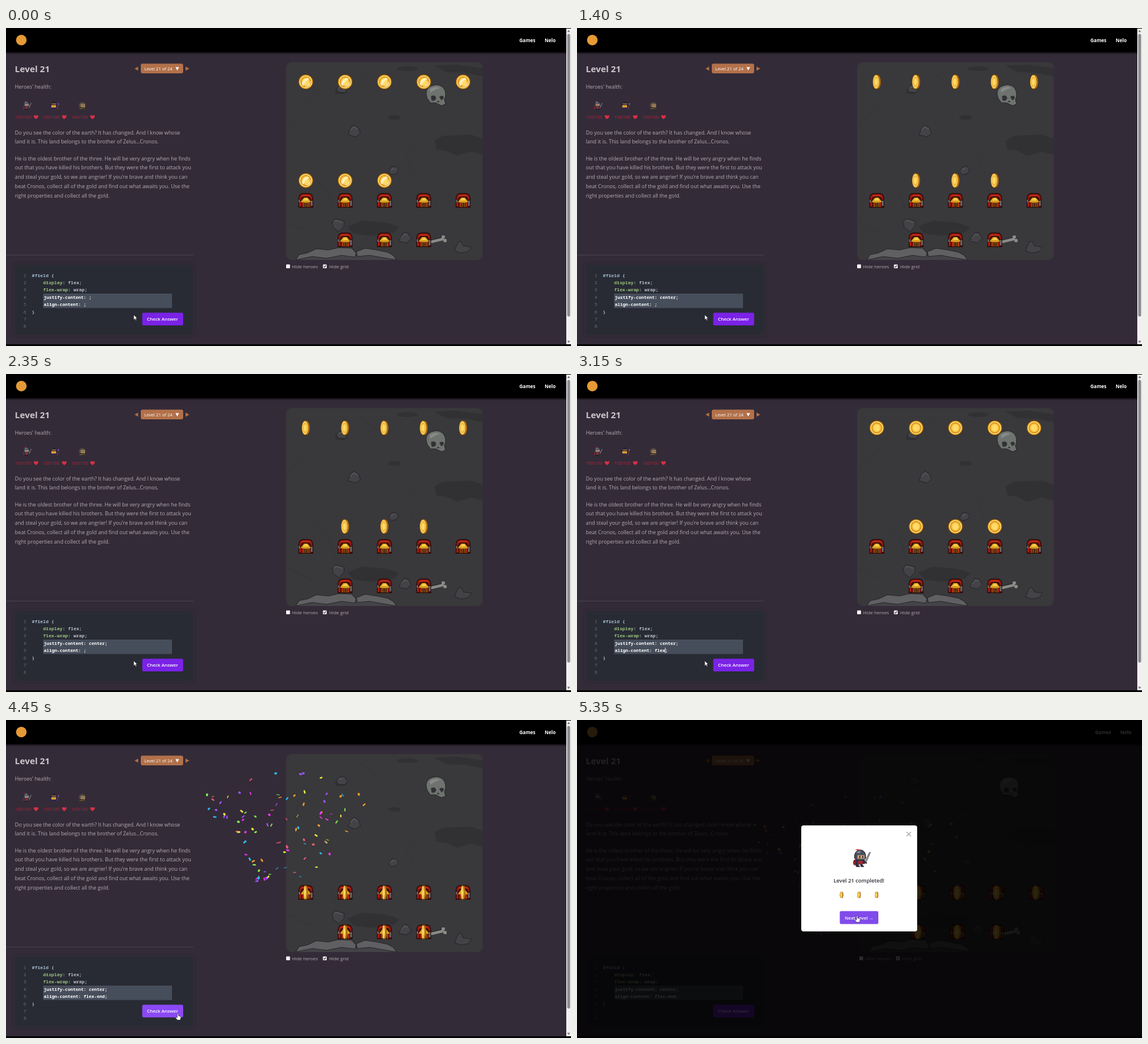
An HTML page that plays this animation: 960x540 px, repeating every 5.4 s.

```html
<!DOCTYPE html>
<html lang="en">
<head>
<meta charset="utf-8">
<title>Level 21</title>
<style>
  html, body { margin: 0; width: 100%; height: 100%; overflow: hidden; background: #342b38; }
  svg { display: block; width: 100vw; height: 100vh; font-family: "Open Sans", "Noto Sans", sans-serif; }
  text { white-space: pre; }
  .copy { font-size: 8.86px; fill: #b1acb3; }
  .small { font-size: 7.8px; fill: #b1acb3; }
  .btn { font-size: 7.8px; font-weight: 600; fill: #fff; text-anchor: middle; }
  .hp { font-size: 7.4px; fill: #b3253c; }
  .code { font: 600 7.83px "Noto Sans Mono", "DejaVu Sans Mono", monospace; fill: #b9bec6; }
  .num { font-weight: 400; fill: #69707c; text-anchor: end; }
  .prop { fill: #9bc07c; }
  .sel { fill: #a4b9cf; }
  .input { font-weight: 700; font-size: 7.5px; fill: #fff; }
  .rock { fill: #434347; stroke: #242427; stroke-linejoin: round; }
  .stone { fill: #606063; stroke: #28282b; stroke-width: 1.2; stroke-linejoin: round; }

  .loop { animation: 5400ms linear infinite; }
  #dim, #modal { animation-name: appear; }
  #pointer { animation-name: travel; animation-timing-function: ease-in-out; }
  #hand { animation-name: hand; animation-timing-function: step-end; }
  #arrow { animation-name: arrow; animation-timing-function: step-end; }
  #check { animation-name: check; animation-timing-function: step-end; }
  #next { animation-name: next; animation-timing-function: step-end; }
  #bar { animation-name: bar; animation-timing-function: step-end; }
  #nav { --dx: 8px; }
  #board { --dx: 3.6px; }
  #nav, #board { animation-name: widen; animation-timing-function: step-end; }

  @keyframes appear { 0%, 84.4% { opacity: 0; } 91.8%, 100% { opacity: 1; } }
  @keyframes travel {
    0%, 70% { transform: translate(217px, 487px); }
    77.8%, 83.3% { transform: translate(292px, 498px); }
    88%, 90.7% { transform: translate(473px, 318px); }
    94.4%, 100% { transform: translate(476px, 332px); }
  }
  @keyframes hand { 0% { opacity: 0; } 72.5% { opacity: 1; } 84% { opacity: 0; } 92.6% { opacity: 1; } }
  @keyframes arrow { 0% { opacity: 1; } 72.5% { opacity: 0; } 84% { opacity: 1; } 92.6% { opacity: 0; } }
  @keyframes check { 0% { fill: #7a22e6; } 72.5% { fill: #8b49f6; } 84% { fill: #7a22e6; } }
  @keyframes next { 0% { fill: #7a22e6; } 92.6% { fill: #804bea; } }
  @keyframes bar { 0% { opacity: 1; } 84.4% { opacity: 0; } }
  @keyframes widen { 0% { transform: none; } 84.4% { transform: translateX(var(--dx)); } }
</style>
</head>
<body>
<svg viewBox="0 0 960 540">
  <defs>
    <linearGradient id="shade" x2="0" y2="1">
      <stop stop-color="#000" stop-opacity=".5"/><stop offset="1" stop-color="#000" stop-opacity="0"/>
    </linearGradient>
    <filter id="soft" x="-10%" y="-10%" width="120%" height="120%"><feGaussianBlur stdDeviation="2.5"/></filter>
    <clipPath id="frame"><rect x="476" y="58" width="334" height="336" rx="9"/></clipPath>

    <g id="coin">
      <g id="edge">
        <ellipse class="disc" data-r="12.5" ry="12.5" fill="#5f3606"/>
        <ellipse class="disc" data-r="11.7" ry="11.7" fill="#b97413"/>
      </g>
      <g id="face">
        <ellipse class="disc" data-r="12.5" ry="12.5" fill="#80500a"/>
        <ellipse class="disc" data-r="11.6" ry="11.7" fill="#f0b02a"/>
        <ellipse class="disc" data-r="10.4" ry="10.5" fill="#ffe184"/>
        <ellipse id="ring" class="disc" data-r="9" ry="9.2" fill="#b9720f"/>
        <ellipse class="disc" data-r="8" ry="8.2" fill="#f3b935"/>
        <ellipse class="disc" data-r="5.5" ry="6" fill="#ffdb68"/>
        <g id="glint" fill="#fff5cc">
          <path d="M-7 4Q-6-4 3-7L6-5Q-2-1-4 7Z"/><path d="M-2 8Q6 6 8-2Q9 6 3 8Z"/>
        </g>
      </g>
    </g>

    <g id="chest">
      <path d="M-12.500 12V-4Q-12-12-5-12.500H5Q12-12 12.500-4V12Z" fill="#200806"/>
      <path d="M-11.300-1V-4Q-11-10.500-5-11.200H5Q11-10.500 11.300-4V-1Z" fill="#86160c"/>
      <path d="M-10-4Q-9-9-5-10H5Q9-9 10-4L7-7H-7Z" fill="#b9281a"/>
      <path d="M-8-1V-4Q-5-7-3-7H4Q6-7 8-4V-1Z" fill="#35100a"/>
      <path d="M-11.500 1H11V11H-11.500Z" fill="#540f09"/>
      <path d="M-11 2H-8.500V10H-11ZM-6 3H-4V11H-6ZM5 3H7V11H5Z" fill="#b3200f"/>
      <path d="M-8 1L-3-5H3L8 1V3H-8Z" fill="#d99f1e"/>
      <path d="M-5 0L-1-4H2L5 0Z" fill="#f8cf4a"/>
      <path d="M-4 3H5V11H-4Z" fill="#a26f17"/>
      <path d="M-3 4H4V11H-3Z" fill="#35100a"/>
      <path d="M-1 4V11M2 4V11" stroke="#b77e1d"/>
      <path d="M8.500 0H11.500V9H8.500ZM-12-1H-9.500V3H-12Z" fill="#6d6966"/>
    </g>

    <g id="knight">
      <path d="M7 7L15-9 17-10 16-7 9 9Z" fill="#a9afb9" stroke="#292d38" stroke-width=".8"/>
      <path d="M5 4L11 9" stroke="#503326" stroke-width="2"/>
      <path d="M-11 3Q-14 8-11 12H-6V2Z" fill="#8b2030"/>
      <path d="M-8 1H7L8 10H4V14H0V11H-3V14H-8Z" fill="#30313f"/>
      <path d="M-4 3H4V10H-4Z" fill="#a82832"/>
      <path d="M-7 14H-1M1 14H6" stroke="#17171f" stroke-width="2"/>
      <path d="M-10 0Q-11-13 0-14Q10-13 9 0L5 4H-6Z" fill="#474f5e" stroke="#20232d"/>
      <path d="M-7-9Q-4-13 1-12L-1-8Z" fill="#7d8796"/>
      <path d="M-5-5H7V1H-5Z" fill="#d5a178"/>
      <path d="M-1-4V0M4-4V0" stroke="#191b22" stroke-width="1.600"/>
      <path d="M-1-14Q-6-17-9-13Q-5-15-1-12Z" fill="#ce2635"/>
    </g>
    <path id="heart" d="M0 3.700C-7-1-3-5 0-2C3-5 7-1 0 3.700Z" fill="#d92f45"/>
  </defs>

  <rect width="960" height="540" fill="#342b38"/>
  <rect width="960" height="41.500" fill="#000"/>
  <rect y="41.500" width="960" height="4" fill="url(#shade)"/>
  <circle cx="26" cy="20.500" r="9" fill="#e59a36"/>
  <g id="nav" class="loop" font-size="8" font-weight="700" fill="#fff">
    <text x="872.300" y="24.300">Games</text><text x="915.300" y="24.300">Nelo</text>
  </g>

  <text x="15" y="75" font-size="14.900" font-weight="700" fill="#cbc7cd">Level 21</text>
  <path d="M224.500 65.500V72.500L218.500 69ZM305 65.500V72.500L311.500 69Z" fill="#b06f43"/>
  <rect x="229" y="60.500" width="72" height="16.500" rx="3" fill="#b2714a"/>
  <text x="235" y="71.800" font-size="7.500" fill="#fff">Level 21 of 24</text>
  <path d="M288 66.500H294L291 72Z" fill="#fff"/>
  <text class="copy" x="15" y="102.500">Heroes' health:</text>

  <use href="#knight" transform="translate(35 131.500) scale(.5)"/>
  <g transform="translate(81 132)">
    <path d="M-5 1H5L6 6H-6Z" fill="#34264d"/><path d="M-4-2H4V3H-4Z" fill="#d69b32"/>
    <path d="M-8-1L-3-3Q-2-8 2-8L4-3 8-1Z" fill="#292036"/><path d="M-3-3H4" stroke="#d4ac31"/>
    <path d="M6 6L8-3" stroke="#714727"/><circle cx="8" cy="-3" r="1.200" fill="#8a4ce0"/>
  </g>
  <g transform="translate(130 132)">
    <path d="M-5 1H5V7H-5Z" fill="#393431"/><path d="M-6 2V-3Q0-10 5-3V2Z" fill="#4f4a43"/>
    <path d="M-3-3H4V2H-3Z" fill="#b48c60"/><path d="M-1-2V0M2-2V0" stroke="#17171a"/>
    <path d="M-5 5L4 3" stroke="#8c6936"/>
  </g>
  <g class="hp">
    <text x="15" y="153.800">100/100</text><text x="63" y="153.800">100/100</text><text x="111" y="153.800">100/100</text>
  </g>
  <use href="#heart" x="51" y="151"/><use href="#heart" x="99" y="151"/><use href="#heart" x="147" y="151"/>

  <g class="copy">
    <text x="15" y="180.500">Do you see the color of the earth? It has changed. And I know whose</text>
    <text x="15" y="196.200">land it is. This land belongs to the brother of Zelus...Cronos.</text>
    <text x="15" y="224.500">He is the oldest brother of the three. He will be very angry when he finds</text>
    <text x="15" y="240.200">out that you have killed his brothers. But they were the first to attack you</text>
    <text x="15" y="256">and steal your gold, so we are angrier! If you're brave and think you can</text>
    <text x="15" y="271.800">beat Cronos, collect all of the gold and find out what awaits you. Use the</text>
    <text x="15" y="287.500">right properties and collect all the gold.</text>
  </g>

  <path d="M0 385.500H318" stroke="#4b434f"/>
  <rect x="15" y="402" width="303" height="119" fill="#282a33" filter="url(#soft)"/>
  <rect x="19" y="406" width="295" height="111" fill="#282b34"/>
  <rect x="63" y="451" width="219" height="24.500" fill="#474e5b"/>
  <g id="numbers" class="code"></g>
  <g class="code">
    <text x="44" y="422.500"><tspan class="sel">#field</tspan> {</text>
    <text x="63" y="435"><tspan class="prop">display</tspan>: flex;</text>
    <text x="63" y="447.400"><tspan class="prop">flex-wrap</tspan>: wrap;</text>
    <text id="justify" class="input" x="64.300" y="459.700"></text>
    <text id="align" class="input" x="64.300" y="472.100"></text>
    <text x="44" y="484.500">}</text>
    <rect id="caret" width=".9" height="9" fill="#fff"/>
  </g>
  <rect id="check" class="loop" x="231.500" y="483.500" width="69.500" height="21.500" rx="2.500"/>
  <text class="btn" x="266" y="497">Check Answer</text>

  <g id="board" class="loop">
    <g clip-path="url(#frame)">
      <rect x="476" y="58" width="334" height="336" fill="#39383b"/>
      <g fill="#313134">
        <ellipse cx="660" cy="152" rx="11" ry="4"/><ellipse cx="682" cy="69" rx="18" ry="4"/>
        <path d="M728 191L742 183 790 181 810 188V215L790 210 766 217 747 208 732 207Z"/>
        <path d="M580 337L605 327 648 331 668 338 660 347 620 353 590 349Z"/>
        <path d="M728 64L765 62 810 68V82L780 76 748 75ZM559 104L581 107 574 112H560Z"/>
      </g>
      <path d="M476 171L510 130 531 103M520 250L548 279 562 316M600 72L633 96M700 190L680 220 695 250M478 330L520 350" fill="none" stroke="#353438"/>
      <g class="rock">
        <path d="M561 104L567 97 575 96 580 104 576 110 565 109Z"/>
        <path d="M581 181L586 169 592 165 600 171 602 180 594 185Z"/>
        <path d="M650 244L655 236 662 235 667 240 664 247 655 249Z"/>
        <path d="M554 329L560 324 575 328 574 337 566 346 556 339Z"/>
        <path d="M667 362L676 347 683 348 689 358 680 365Z"/>
        <path d="M762 378L768 364 773 362 777 370 791 372 785 380 772 382Z"/>
      </g>
      <path d="M585 174L591 168 597 172M671 357L677 350 682 352M558 328L563 327 571 330M654 241L660 238M565 101L572 99" fill="none" stroke="#57575b" stroke-width="1.400"/>
      <path d="M492 396L500 387H655L666 396Z" fill="#444347"/>
      <g class="stone">
        <path d="M492 394L498 385 512 382 527 375 548 377 565 373 588 374 595 382 593 389 570 386 545 391 520 388Z"/>
        <path d="M597 388L595 380 610 374 630 377 649 381 658 386 664 394 640 390 618 386Z"/>
      </g>
      <path d="M716 120Q710 105 721 99Q733 93 743 101Q750 111 745 122L747 129 740 132 730 127 721 127Z" fill="#6f736f" stroke="#2b2b2e" stroke-width="1.200"/>
      <path d="M720 104Q729 97 738 102Q730 103 721 110Z" fill="#878a86"/>
      <path d="M722 116Q729 112 731 119Q729 125 723 123ZM736 117Q743 112 744 119L740 123ZM734 123L737 126H732Z" fill="#313134"/>
      <path d="M719 364L740 358" stroke="#29292c" stroke-width="6.500"/>
      <g fill="#898b87" stroke="#29292c"><circle cx="743" cy="355" r="3.700"/><circle cx="746" cy="361" r="3.700"/></g>
      <path d="M719 364L744 358" stroke="#898b87" stroke-width="4.500"/>
      <g id="chests"></g>
      <g id="coins"></g>
    </g>
    <rect x="476" y="401.500" width="6.500" height="6.500" rx="1" fill="#fff"/>
    <text class="small" x="486" y="407.800">Hide heroes</text>
    <rect x="538.500" y="401.500" width="6.500" height="6.500" rx="1" fill="#eee"/>
    <path d="M540 404.800L541.300 406.200 543.700 403" fill="none" stroke="#333" stroke-width="1.100"/>
    <text class="small" x="549" y="407.800">Hide grid</text>
  </g>

  <g id="bar" class="loop">
    <rect x="952" y="1" width="8" height="537" fill="#f1f1f2"/>
    <rect x="953.500" y="10" width="5" height="480" rx="2.500" fill="#8c8c8e"/>
    <path d="M953.500 7H958.500L956 3ZM953.500 531H958.500L956 535Z" fill="#818183"/>
  </g>
  <rect y="537" width="960" height="3" fill="#050405"/>

  <g id="confetti"></g>
  <rect id="dim" class="loop" width="960" height="540" fill="#000" fill-opacity=".83"/>

  <g id="modal" class="loop">
    <rect x="381" y="179" width="197" height="180" rx="4" fill="#fff"/>
    <path d="M560 190L567.500 197.500M567.500 190L560 197.500" stroke="#a4a4a8" stroke-width="1.200"/>
    <use href="#knight" x="481.500" y="234.500"/>
    <text x="479" y="276.300" font-size="9" font-weight="600" fill="#303038" text-anchor="middle">Level 21 completed!</text>
    <g id="prizes"></g>
    <rect id="next" class="loop" x="446.500" y="324.500" width="65.500" height="22" rx="2.500"/>
    <text class="btn" x="479.500" y="338.700">Next Level →</text>
  </g>

  <g id="pointer" class="loop">
    <path id="arrow" class="loop" d="M0 0V8.500L2 6.700 3.500 9.800 4.900 9.200 3.500 6.100H6Z" fill="#fff" stroke="#1b1b20" stroke-width=".6"/>
    <path id="hand" class="loop" d="M-1 1Q0-.5 1 1V4.500L4 5Q5.500 5.500 5 8L4 11.500H-1L-4 7.300Q-3.500 5.500-1 7.500Z" fill="#fff" stroke="#1b1b20" stroke-width=".6"/>
  </g>
</svg>
<script>
const LOOP = 5400, CELL = 66.8, TICK = 1000 / 60, BURST = 4210;
const $ = id => document.getElementById(id);

function add(parent, tag, attrs) {
  const el = document.createElementNS('http://www.w3.org/2000/svg', tag);
  for (const key in attrs) el.setAttribute(key, attrs[key]);
  return $(parent).appendChild(el);
}

let seed = 21;
const rand = () => (seed = seed * 16807 % 2147483647) / 2147483647;

for (let i = 1; i <= 8; i++)
  add('numbers', 'text', { class: 'num', x: 34.5, y: 410.1 + i * 12.4 }).textContent = i;

const cellX = col => 509.4 + col * CELL;
const place = (el, x, y) => el.setAttribute('transform', `translate(${x} ${y})`);
const coins = [];
for (let i = 0; i < 8; i++) {
  const x = cellX(i < 5 ? i : i - 4);
  place(add('chests', 'use', { href: '#chest' }), x, i < 5 ? 293 : 360);
  coins.push(add('coins', 'use', { href: '#coin' }));
}
for (const x of [449.5, 479.2, 509])
  add('prizes', 'use', { href: '#coin', transform: `translate(${x} 297) scale(.42)` });

// One half turn per second, in ten steps; the rim shows beside a turned face
const WIDTHS = [1, 1, 1, .8, .47, .2, .47, .8, 1, 1];
const discs = document.querySelectorAll('.disc');
function spin(t) {
  const step = Math.floor((t + 80) / 100) % 10, w = WIDTHS[step];
  const depth = 1.3 * Math.sqrt(1 - w * w) * (step > 5 ? -1 : 1);
  discs.forEach(d => d.setAttribute('rx', d.dataset.r * w));
  place($('edge'), depth, 0);
  place($('face'), -depth, 0);
  $('ring').setAttribute('opacity', w);
  $('glint').setAttribute('opacity', step === 0 || step > 7 ? .85 : 0);
}

function type(id, label, word, start, pace, t) {
  const n = Math.max(0, Math.min(word.length, Math.floor((t - start) / pace) + 1));
  const text = `${label}: ${word.slice(0, n)};`;
  if ($(id).textContent !== text) $(id).textContent = text;
  if (n > 0 && t < start + word.length * pace) {
    $('caret').setAttribute('x', 64 + (label.length + 2 + n) * 4.5);
    $('caret').setAttribute('y', id === 'justify' ? 452.5 : 464.8);
    $('caret').setAttribute('opacity', 1);
  }
  return n === word.length;
}

const COLORS = ['#26ccff', '#a25afd', '#ff5e7e', '#88ff5a', '#fcff42', '#ffa62d', '#ff36ff'];
const bits = Array.from({ length: 100 }, (_, i) => ({
  el: add('confetti', i % 2 ? 'ellipse' : 'rect', i % 2
    ? { rx: 2.5, ry: 2 }
    : { x: -2.7, y: -1.4, width: 5.4, height: 2.8 }),
  color: COLORS[i % 7],
  angle: (rand() - .5) * 66 * Math.PI / 180,
  reach: 115 + rand() * 225,
  turn: rand() * 360,
  wobble: rand() * 10,
  rate: .08 + rand() * .08
}));
bits.forEach(b => b.el.setAttribute('fill', b.color));

function burst(t) {
  const n = (t - BURST) / TICK;
  $('confetti').setAttribute('visibility', n > 0 ? 'visible' : 'hidden');
  if (n <= 0) return;
  $('confetti').setAttribute('opacity', 1 - n / 200);
  const spread = 1 - .9 ** n;
  for (const b of bits) {
    const phase = b.wobble + n * b.rate;
    const x = 476 + Math.sin(b.angle) * b.reach * spread + 3 * Math.cos(phase);
    const y = 322 - Math.cos(b.angle) * b.reach * spread + 2.1 * n;
    b.el.setAttribute('transform',
      `translate(${x} ${y}) rotate(${b.turn + n * b.rate * 40}) scale(1 ${.25 + .7 * Math.abs(Math.sin(phase))})`);
  }
}

let start;
function draw(now) {
  start ??= now;
  const t = (now - start) % LOOP;
  $('caret').setAttribute('opacity', 0);
  const centered = type('justify', 'justify-content', 'center', 500, 110, t);
  const ended = type('align', 'align-content', 'flex-end', 2700, 130, t);
  coins.forEach((coin, i) => {
    const low = i > 4, col = low ? i - 5 + centered : i;
    place(coin, cellX(col), ended ? 293 + 67 * low : 91.4 + 167.6 * low);
  });
  spin(t);
  burst(t);
  requestAnimationFrame(draw);
}
requestAnimationFrame(draw);
</script>
</body>
</html>
```
